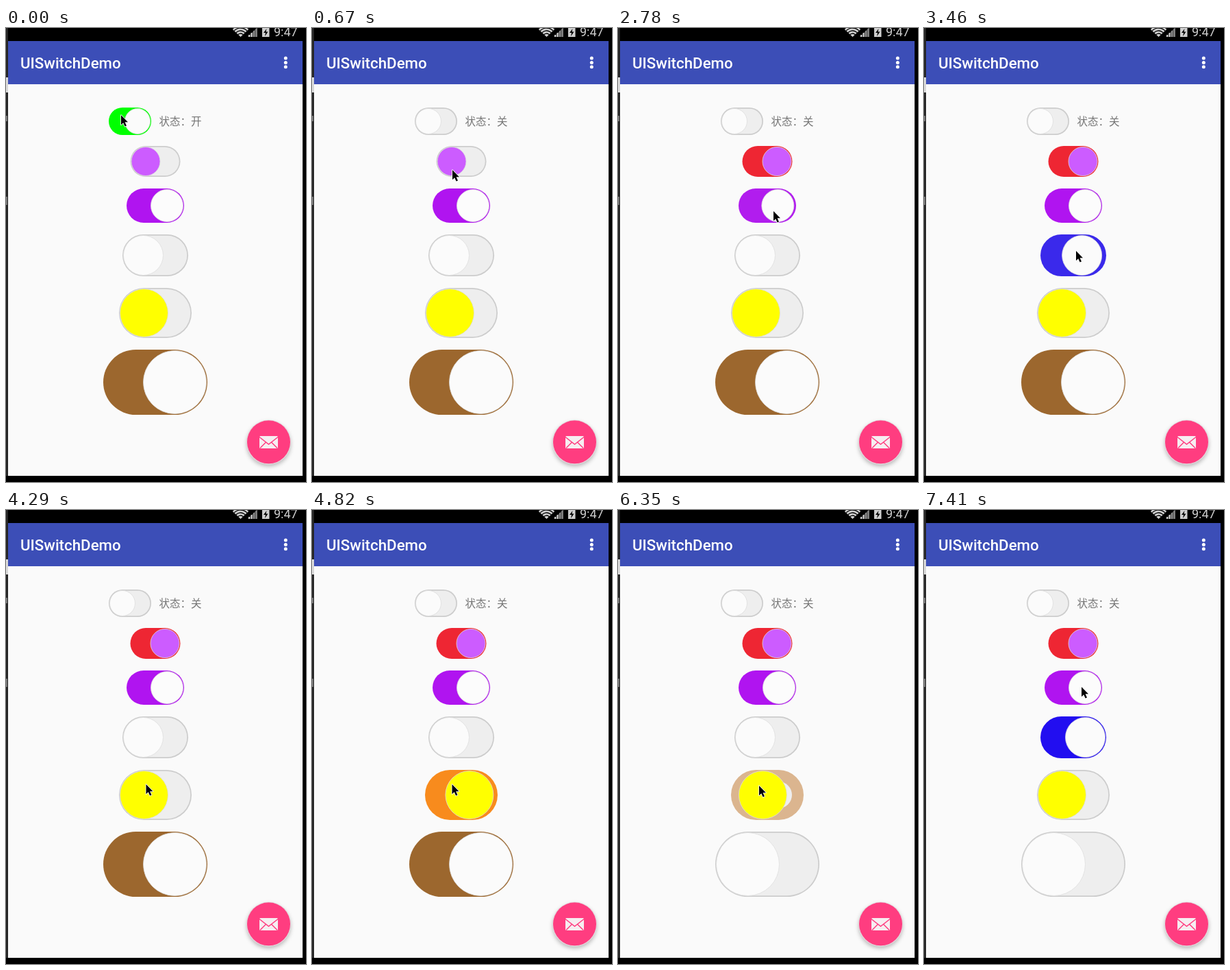
An HTML page with a canvas that plays this animation: 438 by 662 pixels, repeating every 8 s.

```html
<!DOCTYPE html>
<html lang="zh">
<head>
<meta charset="utf-8">
<title>UISwitchDemo</title>
<style>
html, body { margin: 0; width: 438px; height: 662px; overflow: hidden; background: #000; }
canvas { display: block; }
</style>
</head>
<body>
<canvas id="stage" width="438" height="662"></canvas>
<script>
const g = document.getElementById('stage').getContext('2d');
const LOOP = 8000;
const GREY = [204, 204, 204];

// x, y, width, height, colour when on, knob colour, on at start
const switches = [
  [150, 116, 62, 40, [0, 255, 0], '#fbfbfb', 1],
  [181.5, 172, 73, 45, [238, 38, 51], '#cc5cff', 0],
  [176, 234, 84, 50, [176, 20, 240], '#fcfcfc', 1],
  [170, 301, 96, 61, [34, 14, 240], '#fbfbfb', 0],
  [165, 379, 106, 73, [255, 128, 0], '#ffff00', 0],
  [142, 469, 152, 95, [156, 103, 46], '#fbfbfb', 1]
];

// start, end, steps, switch tapped, where the pointer goes afterwards
const taps = [
  [390, 670, 6, 0, 205, 207],
  [1270, 1550, 6, 1, 227, 267],
  [1970, 2260, 6, 2, 227, 267],
  [2550, 3010, 9, 2, 222, 325],
  [3240, 3520, 6, 3, 222, 325],
  [3940, 4290, 7, 3, 204.5, 400],
  [4590, 5180, 11, 4, 227, 506],
  [5540, 5990, 9, 5, 206, 402],
  [6230, 6580, 7, 4, 210, 329],
  [6870, 7410, 10, 3, 230, 258]
];
const slide = [0.39, 0.57, 0.7, 0.86, 0.95, 1];

const lerp = (a, b, p) => a + (b - a) * p;

function stateAt(t) {
  const on = switches.map(s => s[6]);
  let x = 168, y = 127, label = '开';
  for (const [start, end, steps, i, toX, toY] of taps) {
    if (t < start) break;
    const pos = (t - start) / (end - start) * (steps - 1);
    const k = Math.min(steps - 1, Math.floor(pos + 0.001));
    on[i] = lerp(on[i], 1 - on[i], slide[Math.min(k, 5)]);
    const move = Math.max(0, (k - 4) / (steps - 5));
    x = lerp(x, toX, move);
    y = lerp(y, toY, move);
    if (i === 0 && k >= 5) label = '关';
  }
  return { on, x, y, label };
}

function rect(x, y, w, h, fill) {
  g.fillStyle = fill;
  g.fillRect(x, y, w, h);
}

function pill(x, y, w, h, fill) {
  g.beginPath();
  g.roundRect(x, y, w, h, h / 2);
  g.fillStyle = fill;
  g.fill();
}

function disc(x, y, r, fill) {
  g.beginPath();
  g.arc(x, y, r, 0, Math.PI * 2);
  g.fillStyle = fill;
  g.fill();
}

function poly(points, fill) {
  g.beginPath();
  points.forEach(p => g.lineTo(p[0], p[1]));
  g.closePath();
  g.fillStyle = fill;
  g.fill();
}

function text(str, x, y, font, fill) {
  g.font = font;
  g.fillStyle = fill;
  g.fillText(str, x, y);
}

function drawSwitch([x, y, w, h, color, knob], on) {
  const r = h / 2;
  const mix = GREY.map((c, i) => Math.round(lerp(c, color[i], on)));
  pill(x, y, w, h, `rgb(${mix})`);
  const d = 1.7 + Math.min(1, on * 1.4) * r;
  if (d < r) pill(x + d, y + d, w - 2 * d, h - 2 * d, '#eeeeee');
  disc(lerp(x + r, x + w - r, on), y + r, r - 1.5, knob);
  g.strokeStyle = '#dddddd';
  g.lineWidth = 0.8;
  g.stroke();
}

function drawStatusBar() {
  const icon = '#cfcfcf';
  // wifi fan, cut by the top edge
  g.beginPath();
  g.moveTo(342.5, 13);
  g.arc(342.5, 13, 16, -Math.PI * 0.76, -Math.PI * 0.24);
  g.closePath();
  g.fillStyle = icon;
  g.fill();
  g.strokeStyle = '#000';
  g.lineWidth = 1.3;
  for (const r of [5, 9, 13]) {
    g.beginPath();
    g.arc(342.5, 13, r, -Math.PI * 0.8, -Math.PI * 0.2);
    g.stroke();
  }
  poly([[353, 13], [367, 13], [367, -1]], '#555');
  for (let i = 0; i < 4; i++) rect(354 + i * 3.5, 10 - i * 3, 2, 3 + i * 3, i < 2 ? icon : '#888');
  rect(374, 0, 10.5, 13, icon);
  poly([[380.5, 1], [376, 7], [379, 7], [378, 12], [382.5, 5.5], [379.5, 5.5]], '#000');
  text('9:47', 391, 12, '18px Roboto, sans-serif', '#d0d0d0');
}

function drawMailButton() {
  g.save();
  g.shadowColor = 'rgba(0,0,0,0.28)';
  g.shadowBlur = 6;
  g.shadowOffsetY = 3;
  disc(383.5, 604, 32, '#ff3d80');
  g.restore();
  disc(383.5, 604, 32.5, '#e3dde0');
  disc(383.5, 603.8, 31.5, '#ff3d80');
  g.beginPath();
  g.roundRect(370, 595, 27, 18, 1.5);
  g.fillStyle = '#f6eef1';
  g.fill();
  g.strokeStyle = '#ff3d80';
  g.lineWidth = 1.5;
  g.beginPath();
  g.moveTo(370, 596.5);
  g.lineTo(383.5, 607);
  g.lineTo(397, 596.5);
  g.moveTo(371, 612.5);
  g.lineTo(379.5, 604);
  g.moveTo(396, 612.5);
  g.lineTo(387.5, 604);
  g.stroke();
}

function drawPointer(x, y) {
  g.save();
  g.translate(x, y);
  g.beginPath();
  [[0, 0], [0, 14.2], [3.2, 11.2], [5.6, 16.6], [8, 15.5], [5.6, 10.3], [10, 10.3]]
    .forEach(p => g.lineTo(p[0], p[1]));
  g.closePath();
  g.lineJoin = 'round';
  g.lineWidth = 1.6;
  g.strokeStyle = '#fff';
  g.stroke();
  g.fillStyle = '#000';
  g.fill();
  g.restore();
}

function draw(t) {
  const s = stateAt(t);
  rect(0, 0, 438, 662, '#000');
  rect(0, 0, 3, 653, '#262626');
  rect(0, 72, 3, 22, '#d8d8d8');
  rect(0, 128, 2, 8, '#777');
  rect(0, 246, 2, 12, '#777');
  rect(3, 0, 430, 19, '#000');
  rect(3, 19, 430, 63, '#3c4eb7');
  rect(3, 82, 430, 571, '#fafafa');
  drawStatusBar();
  text('UISwitchDemo', 21, 59, '500 22.3px Roboto, sans-serif', '#fff');
  for (const y of [44, 50.4, 56.8]) disc(408.3, y, 2.5, '#fff');
  switches.forEach((sw, i) => drawSwitch(sw, s.on[i]));
  text('状态：' + s.label, 223.5, 142, '15.5px "Noto Sans CJK TC", "Noto Sans CJK JP", sans-serif', '#757575');
  drawMailButton();
  drawPointer(s.x, s.y);
}

const begin = performance.now();
function tick(now) {
  draw(Math.max(0, now - begin) % LOOP);
  requestAnimationFrame(tick);
}
draw(0);
requestAnimationFrame(tick);
</script>
</body>
</html>
```
